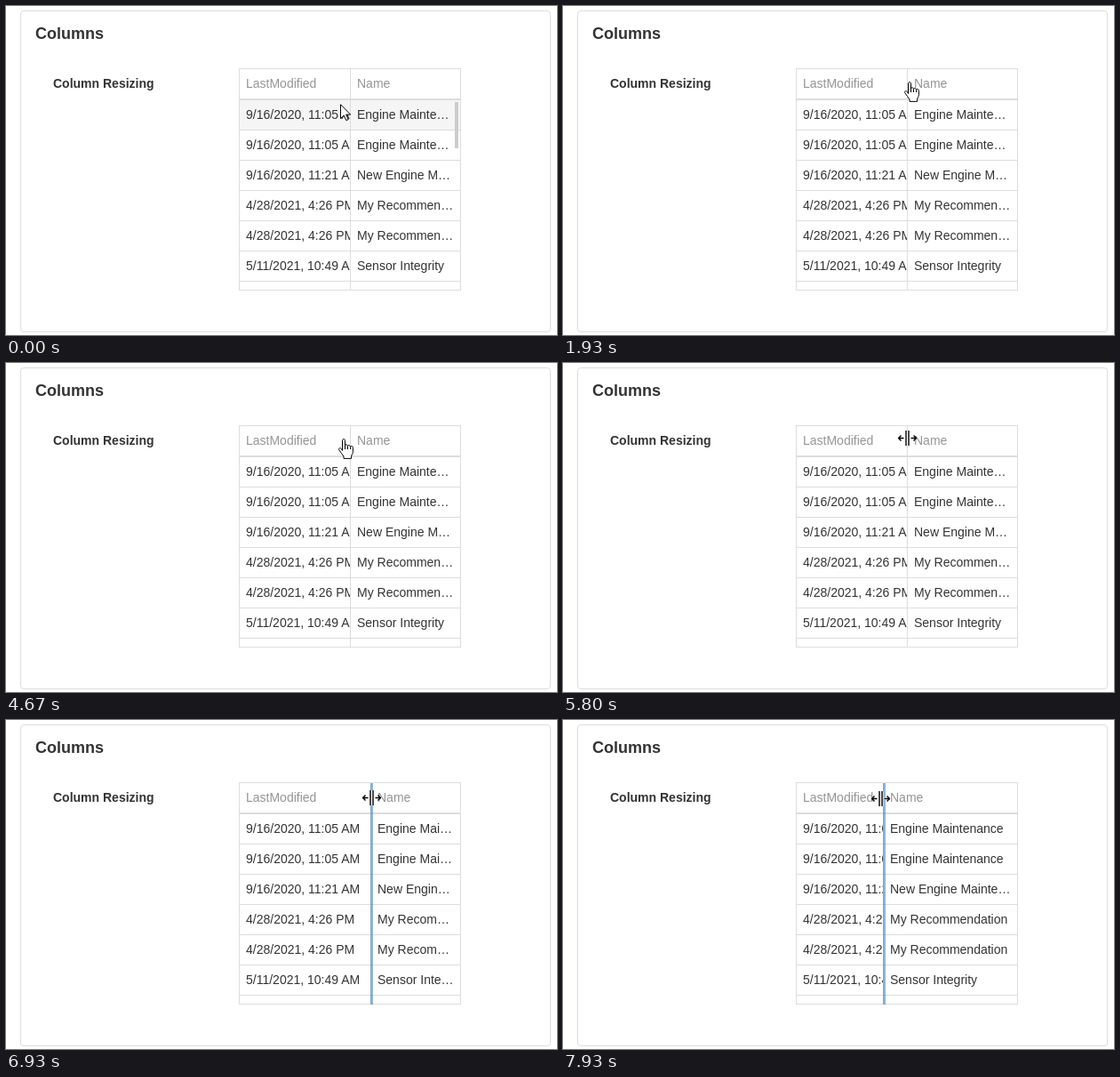
An HTML page for the animation above (8000 ms loop, 620x370 px).

```html
<!DOCTYPE html>
<html lang="en">
<head>
<meta charset="utf-8">
<title>Column Resizing</title>
<style>
  html, body { margin: 0; width: 100%; height: 100%; overflow: hidden; background: #fff; }
  body { position: relative; font: 14px/16px "Liberation Sans", Arial, sans-serif; color: #333; }
  body > * { position: absolute; box-sizing: border-box; margin: 0; }
  .card { left: 16px; top: 5px; width: 597px; height: 362px; border: 1px solid #ddd; border-radius: 4px; }
  h1 { left: 33px; top: 21px; font-size: 18px; line-height: 20px; }
  h2 { left: 53px; top: 79px; font-size: 14px; }
  .grid { --b: 387; left: 262px; top: 70px; width: 250px; height: 250px; border: 1px solid #ddd; overflow: hidden; }
  .row { display: flex; height: 33px; line-height: 32px; border-bottom: 1px solid #ddd; white-space: nowrap; }
  .head { color: #959595; border-bottom-width: 2px; }
  .hover { background: #f5f5f5; }
  .row span { box-sizing: border-box; overflow: hidden; padding-left: 7px; }
  .row span:first-child { flex: none; width: calc(var(--b) * 1px - 262px); border-right: 1px solid #ddd; }
  .row span:last-child { flex: 1; min-width: 0; padding-right: 7px; text-overflow: ellipsis; }
  .bar { left: 505px; top: 108px; width: 4px; height: 52px; background: #ccc; }
  .guide { top: 71px; width: 3px; height: 249px; background: rgba(51, 122, 183, .55); }
  .cursor { left: 0; top: 0; width: 100%; height: 100%; pointer-events: none; }
  .cursor g { fill: #fff; stroke: #000; stroke-linejoin: round; }
</style>
</head>
<body>
<div class="card"></div>
<h1>Columns</h1>
<h2>Column Resizing</h2>
<div class="grid"><div class="row head"><span>LastModified</span><span>Name</span></div></div>
<div class="bar"></div>
<div class="guide"></div>
<svg class="cursor">
  <g id="a"><path d="M.5 .8V16.6L4.2 13L6.8 18.6L9.2 17.6L6.7 12.1H11.7Z"/></g>
  <g id="h"><path transform="translate(-6)" d="M4.5 13.5V2.2C4.5 0 7.5 0 7.5 2.2V8C7.7 6.2 10.4 6.4 10.5 8.4C10.8 7 13.3 7.2 13.5 9.2C13.9 8 16.4 8.2 16.4 10.4V14.8C16.4 17.2 14.5 18.5 14.5 20.2V22.4H6V20.2C4.5 17.5 2.5 15.5 .8 12.8C-.2 11 2 9.8 3.2 11.4ZM7.5 8V12M10.5 8.4V12M13.5 9.2V12"/></g>
  <g id="r">
    <path id="split" style="fill:none;stroke:#fff;stroke-width:3" d="M-1 -8V9M2 -8V9M-3.5 .5H-9M4.5 .5H10"/>
    <path style="fill:none;stroke-width:1.4" d="M-1 -8V9M2 -8V9M-3.5 .5H-9M4.5 .5H10M-6.5 -2.5L-9.5 .5L-6.5 3.5M7.5 -2.5L10.5 .5L7.5 3.5"/>
  </g>
</svg>
<script>
  const $ = s => document.querySelector(s);
  const grid = $('.grid'), bar = $('.bar'), guide = $('.guide');
  const REST = 387, LAG = 0.72;

  const rows = [
    ['9/16/2020, 11:05 AM', 'Engine Maintenance'],
    ['9/16/2020, 11:05 AM', 'Engine Maintenance'],
    ['9/16/2020, 11:21 AM', 'New Engine Maintenance'],
    ['4/28/2021, 4:26 PM', 'My Recommendation'],
    ['4/28/2021, 4:26 PM', 'My Recommendation'],
    ['5/11/2021, 10:49 AM', 'Sensor Integrity'],
    ['', '']
  ].map(cells => {
    const row = document.createElement('div');
    row.className = 'row';
    row.innerHTML = cells.map(c => `<span>${c}</span>`).join('');
    return grid.appendChild(row);
  });

  // tick, x, y, pointer: a arrow, h hand, r resize; a capital glides to the next key
  const path = [
    [0, 376, 110, 'A'], [4, 360, 102, 'H'], [8, 348, 94, 'H'], [11, 398, 88, 'H'],
    [13, 390, 87, 'h'], [14, 386, 86, 'r'], [15, 384, 85, 'r'], [16, 383, 85, 'h'],
    [19, 384, 85, 'h'], [22, 385, 84, 'a'], [26, 386, 85, 'r'], [28, 388, 85, 'r'],
    [29, 390, 85, 'h'], [33, 389, 85, 'r'], [36, 390, 85, 'h'], [47, 415, 111, 'a'],
    [48, 0, 0, ''], [60, 607, 326, 'A'], [66, 480, 170, 'A'], [68, 392, 104, 'H'],
    [69, 372, 90, 'H'], [70, 380, 85, 'H'], [72, 390, 85, 'h'], [73, 390, 86, 'r'],
    [74, 392, 86, 'h'], [80, 389, 83, 'h'], [85, 390, 84, 'h'], [87, 387, 84, 'r'],
    [93, 387, 85, 'R'], [98, 401, 86, 'R'], [104, 411, 87, 'r'], [106, 411, 87, 'R'],
    [111, 391, 88, 'R'], [119, 357, 88, 'r']
  ];
  // start, end, x of the grab
  const drags = [[33, 36, 389], [94, 120, 387]];

  function pointerAt(tick) {
    const i = path.findLastIndex(k => k[0] <= tick);
    const [t, x, y, kind] = path[i], next = path[i + 1];
    const glide = next && kind !== kind.toLowerCase();
    const p = glide ? (tick - t) / (next[0] - t) : 0;
    return {
      x: glide ? x + (next[1] - x) * p : x,
      y: glide ? y + (next[2] - y) * p : y,
      kind: kind.toLowerCase()
    };
  }

  function draw(tick) {
    const { x, y, kind } = pointerAt(tick);
    for (const id of 'ahr') {
      const g = document.getElementById(id);
      g.style.display = id === kind ? '' : 'none';
      g.setAttribute('transform', `translate(${Math.round(x)} ${Math.round(y)})`);
    }

    const drag = drags.find(d => tick >= d[0] && tick < d[1]);
    // the column edge trails the pointer a little
    const trail = drag ? pointerAt(Math.max(tick - LAG, drag[0] - 1)).x - drag[2] : 0;
    const edge = drag && drag[0] === 33 ? REST : REST + Math.round(trail);
    grid.style.setProperty('--b', edge);
    guide.style.display = drag ? '' : 'none';
    guide.style.left = edge + 'px';

    const over = kind === 'a' && x > 262 && x < 511 ? Math.floor((y - 106) / 34) : -1;
    rows.forEach((row, i) => row.classList.toggle('hover', i === over));
    bar.style.opacity = tick < 19 ? 1 : tick < 20 ? 0.66 : tick < 22 ? 0.33 : 0;
  }

  const start = performance.now();
  function loop() {
    const t = (performance.now() - start) % 8000;
    draw(Math.min(119, Math.floor((t + 5) * 15 / 1000)));
    requestAnimationFrame(loop);
  }
  loop();
</script>
</body>
</html>
```
